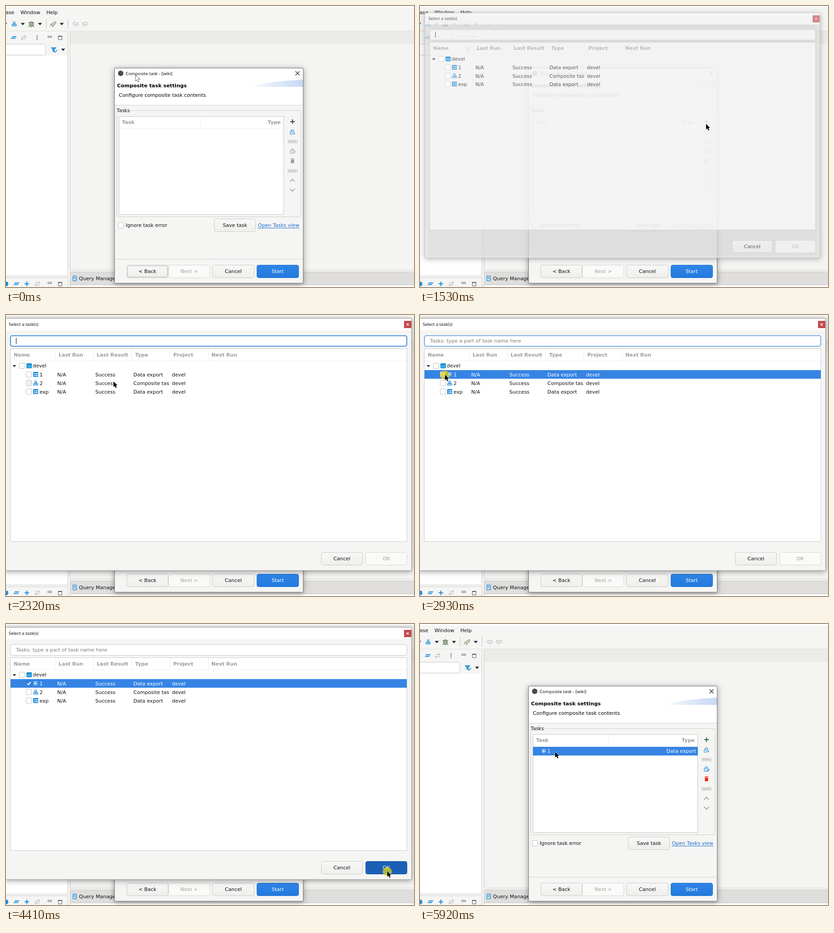
Animation, 900 px wide and 622 px high, one loop 7.17 s. Source, as an HTML page with a canvas:

```html
<!DOCTYPE html>
<html lang="en">
<head>
<meta charset="utf-8">
<title>Composite task</title>
<style>
  html, body { margin: 0; height: 100%; overflow: hidden; background: #f5f5f4; }
  canvas { display: block; }
</style>
</head>
<body>
<canvas width="900" height="622"></canvas>
<script>
const LOOP = 7170;
const ctx = document.querySelector('canvas').getContext('2d');
const UI = '11px "DejaVu Sans", sans-serif';
const BOLD = 'bold ' + UI;
const TITLE = '9.8px "Open Sans", sans-serif';
const BG = '#f5f5f4', INK = '#111', MUTED = '#9c9c9b', BLUE = '#3584e4', ICON = '#1b8ad6';
const ROW_TOP = 121.5, ROW_HEIGHT = 19.3;

// Moments of the story, in ms
const OPEN = 1450, FOCUS = 1700, SELECT = 2890, CHECK = 3010, PRESS = 4360, CLOSE = 4490, ADDED = 4550, PICK = 5840;
const CLICKS = [[1120, 1320], [2840, 3010], [PRESS, CLOSE], [5790, 5920]];

const smooth = u => u * u * (3 - 2 * u);
const easeIn = u => u ** 1.4;
const easeOut = u => 1 - (1 - u) ** 2;
const clamp = u => Math.max(0, Math.min(1, u));

// Pointer moves: first change, last change, number of changes, goal x, goal y, easing
const MOVES = [
  [30, 100, 3, 317, 162, smooth],
  [330, 990, 15, 629, 261, smooth],
  [1420, 1420, 1, 631, 261, smooth],
  [1860, 2320, 10, 237, 147, easeIn],
  [2370, 2650, 7, 55, 132, easeOut],
  [3390, 4080, 16, 841, 547, smooth],
  [4870, 5560, 16, 307, 287, smooth],
  [5610, 5610, 1, 298, 283, smooth],
];

function pointerAt(t) {
  let x = 286, y = 153;
  for (const [from, to, steps, goalX, goalY, ease] of MOVES) {
    if (t < from) break;
    const done = steps > 1 ? Math.floor((t - from) / (to - from) * (steps - 1) + 1e-6) + 1 : 1;
    const u = ease(Math.min(done, steps) / steps);
    x += (goalX - x) * u;
    y += (goalY - y) * u;
  }
  return { x, y };
}

function rect(x, y, w, h, color) {
  ctx.fillStyle = color;
  ctx.fillRect(x, y, w, h);
}

function box(x, y, w, h, fill, stroke, radius = 0, width = 1) {
  ctx.beginPath();
  ctx.roundRect(x + width / 2, y + width / 2, w - width, h - width, radius);
  if (fill) { ctx.fillStyle = fill; ctx.fill(); }
  if (stroke) { ctx.strokeStyle = stroke; ctx.lineWidth = width; ctx.stroke(); }
}

function text(label, x, y, color = INK, font = UI, align = 'left') {
  ctx.font = font;
  ctx.fillStyle = color;
  ctx.textAlign = align;
  ctx.fillText(label, x, y);
}

function shape(x, y, d, stroke, width = 1.2, fill) {
  const path = new Path2D(d);
  ctx.save();
  ctx.translate(x, y);
  if (fill) { ctx.fillStyle = fill; ctx.fill(path); }
  if (stroke) { ctx.strokeStyle = stroke; ctx.lineWidth = width; ctx.stroke(path); }
  ctx.restore();
}

function shadowed(draw) {
  ctx.save();
  ctx.shadowColor = 'rgba(0,0,0,.4)';
  ctx.shadowBlur = 12;
  ctx.shadowOffsetY = 2;
  draw();
  ctx.restore();
}

function button(label, x, y, w, style = 'plain') {
  const [top, bottom, edge, ink] = {
    plain: ['#f8f8f7', '#efeeed', '#cdc7c2', INK],
    off: ['#fafaf9', '#fafaf9', '#d8d5d2', '#a0a09f'],
    main: ['#2f86e8', '#2379dd', '#2273d4', '#fff'],
    hover: ['#3a8eec', '#2b81e3', '#2273d4', '#fff'],
    down: ['#1a5fb4', '#1b61b8', '#15539e', '#fff'],
  }[style];
  const fill = ctx.createLinearGradient(0, y, 0, y + 29);
  fill.addColorStop(0, top);
  fill.addColorStop(1, bottom);
  box(x, y, w, 29, fill, edge, 4);
  text(label, x + w / 2, y + 18, ink, UI, 'center');
}

function checkbox(x, y, state) {
  const on = state === 'on';
  box(x, y, 13, 13, on ? BLUE : state === 'hover' ? '#f0f0ef' : '#fff', on ? '#2a76d2' : '#c3beb9', 2);
  if (on) shape(x, y, 'M3 6.5L5.5 9.5L10.5 3.5', '#fff', 2);
}

const caret = (x, y) => shape(x, y, 'M-4.5 -2.5H4.5L0 2.5Z', null, 0, '#222');
const minus = (x, y) => shape(x, y, 'M-4 -2H6M-6 1.5H4', ICON, 1.8);
const swap = (x, y) => shape(x, y, 'M-5 -2H5L2 -5M5 2H-5L-2 5', '#aaa', 1.2);
const windowIcons = y => {
  box(92, y - 4, 9, 4, '#fff', '#555');
  box(115, y - 4, 9, 9, '#fff', '#555');
  rect(115, y - 4, 9, 2, '#555');
};
const dots = (x, y, count, dx, dy, color) => {
  for (let i = 0; i < count; i++) rect(x + i * dx, y + i * dy, 1.5, 1.5, color);
};

function exportIcon(x, y, selected) {
  const main = selected ? '#e8f6ff' : ICON, gap = selected ? BLUE : '#fff';
  rect(x, y, 11, 11, selected ? BLUE : ICON);
  if (selected) box(x + 1, y + 1, 9, 9, main);
  for (const row of [3, 7]) {
    rect(x + 2, y + row, 2, 2, selected ? '#159bd6' : gap);
    rect(x + 5, y + row, 5, 2, gap);
  }
}

const compositeIcon = (x, y) =>
  shape(x, y, 'M3.5 1H7.5V4.5H3.5ZM5.5 4.5V6.5M2.5 7V6H8.5V7M.7 7H4.3V10.3H.7ZM6.7 7H10.3V10.3H6.7Z', ICON, 1.2);

function drawWorkbench() {
  rect(0, 0, 900, 622, BG);
  rect(0, 0, 900, 3, '#fff');
  text('ase', -1, 18);
  text('Window', 32, 18);
  text('Help', 89, 18);

  for (const x of [-2, 37, 75, 123]) caret(x, 40);
  compositeIcon(12.5, 34);
  shape(56, 40, 'M-3 -3H3V4L0 6L-3 4ZM-3 -1L-6 -4M3 -1L6 -4M-3 1H-6M3 1H6M-3 3L-6 6M3 3L6 6M-2 -3V-5H2V-3M0 -1V4', '#4d6648', 1.2, '#cfdcc4');
  shape(104, 40, 'M-6 1L-1 -2L3 -5H6V-2L1 3L-1 6L-2 2ZM-5 3L-7 6', '#8a8a72', 1.2, '#d9d8c4');
  dots(88, 30, 7, 0, 3, '#aaa');
  dots(136, 30, 7, 0, 3, '#aaa');
  shape(153, 40, 'M-2 -5L-6 -1L-2 3V1H6V-3H-2ZM1 4H5', '#aaa', 1);
  shape(175, 40, 'M2 -5L6 -1L2 3V1H-6V-3H2ZM-1 4H-5', '#aaa', 1);

  // Left panel
  rect(0, 55, 137, 1, '#dededd');
  rect(0, 110, 136, 487, '#fff');
  rect(136, 56, 1, 541, '#c9c9c8');
  rect(0, 597, 137, 1, '#d0d0cf');
  rect(0, 601, 137, 1, '#d0d0cf');
  rect(136, 601, 1, 21, '#c9c9c8');
  minus(17, 70);
  swap(39, 70);
  for (const y of [66, 70, 74]) box(67, y - 1.5, 3, 3, '#fff', '#666', 1);
  windowIcons(70);
  box(-8, 84, 96, 25, '#fff', '#cdc7c2', 4);
  shape(105, 97, 'M-5 -5H5L1.5 0V5L-1.5 3V0Z', ICON, 1.2, '#3d9ee0');
  shape(109, 99, 'M-2 1L0 3L4 -2', ICON, 1.4);
  caret(126, 97);

  shape(0, 615, 'M0 -6L2 -4L5 -4L4 -1L6 1L4 3L3 5L0 5Z', null, 0, ICON);
  minus(23, 615);
  shape(46, 615, 'M-5 0H5M0 -5V5', ICON, 2);
  swap(69, 615);
  windowIcons(615);

  // Editor area and lower tabs
  rect(141, 55, 759, 1, '#dededd');
  rect(141, 56, 759, 28, '#ebebea');
  rect(141, 84, 759, 500, '#f4f4f3');
  rect(141, 56, 1, 529, '#c9c9c8');
  rect(141, 584, 759, 1, '#d0d0cf');
  rect(141, 588, 759, 29, '#dfdedd');
  rect(141, 588, 759, 1, '#c9c9c8');
  rect(141, 617, 759, 1, '#c9c9c8');
  rect(142, 618, 758, 4, '#fff');
  rect(141, 588, 1, 34, '#c9c9c8');
  box(147, 597, 9, 12, '#fff', ICON, 1, 1.5);
  shape(151.5, 603, 'M-2 -2H2M-2 0H1M1 2H3', ICON, 1.5);
  text('Query Manager', 161, 607);
}

function drawTaskTools(picked) {
  shape(632, 256, 'M-5 0H5M0 -5V5', picked ? '#2f6b3c' : '#2c4a38', 2);
  const basket = 'M-5 -1H4M-5 -1V5H1M-3 -1V-4L1 -5L3 -2M-2 2H1';
  shape(632, 279, basket + 'M1 3H6M3.5 .5V5.5', ICON, 1.2);
  shape(632, 321, basket + 'M1 5L5 0L6 2L3 5Z', picked ? ICON : '#a3a3a2', 1.2);
  const bin = picked ? '#ee2d12' : '#999';
  shape(632, 343, 'M-3.5 -3H3.5V5H-3.5ZM-4.5 -5H4.5V-4H-4.5ZM-1.5 -6H1.5V-5H-1.5Z', null, 0, bin);
  for (const y of [296, 361]) {
    rect(621, y, 22, 8, '#dcdcdb');
    dots(625, y + 3, 4, 4, 0, '#999');
  }
  shape(632, 386, 'M-5.5 3L0 -2.5L5.5 3', '#999', 1.6);
  shape(632, 407, 'M-5.5 -2.5L0 3L5.5 -2.5', '#999', 1.6);
}

function drawWizard(t) {
  const added = t >= ADDED, picked = t >= PICK;
  shadowed(() => rect(239, 137, 417, 477, BG));
  rect(240, 138, 415, 81, '#fff');
  rect(240, 219, 415, 1, '#d3d2d1');
  box(239, 137, 417, 477, null, '#777');

  ctx.beginPath();
  ctx.arc(253, 149, 6, 0, 7);
  ctx.fillStyle = '#4b4a48';
  ctx.fill();
  text('Composite task - [wiki]', 264, 153, '#000', TITLE);
  shape(643, 149, 'M-4.5 -4.5L4.5 4.5M4.5 -4.5L-4.5 4.5', '#222', 1.1);
  text('Composite task settings', 245, 180, '#000', 'bold 11.25px "DejaVu Sans", sans-serif');
  text('Configure composite task contents', 249, 201, '#000');

  const wave = ctx.createLinearGradient(536, 0, 655, 0);
  wave.addColorStop(0, '#fff');
  wave.addColorStop(.45, '#e2ebf9');
  wave.addColorStop(1, '#c6d8f3');
  shape(0, 0, 'M536 179Q585 166 655 163V179Z', null, 0, wave);

  box(244, 231, 407, 236, null, '#cfcdcb');
  rect(243, 228, 32, 8, BG);
  text('Tasks', 244, 235);
  box(249, 244, 364, 218, '#fff', '#c8c6c4');
  rect(250, 271, 362, 1, '#eeeeed');
  rect(added ? 415 : 428, 245, 1, 26, '#ececeb');
  text('Task', 256, 261, MUTED, BOLD);
  text('Type', 606, 261, MUTED, BOLD, 'right');
  if (added) {
    if (picked) rect(249, 272, 364, 19, BLUE);
    const ink = picked ? '#fff' : INK;
    exportIcon(268, 276, picked);
    text('1', 281, 285, ink);
    text('Data export', 609, 285, ink, UI, 'right');
  }
  drawTaskTools(picked);

  checkbox(247, 479);
  text('Ignore task error', 264, 489);
  button('Save task', 459, 471, 92);
  text('Open Tasks view', 647, 489, '#1b6acb', UI, 'right');
  rect(555, 491, 92, 1, '#1b6acb');

  rect(240, 560, 415, 1, '#d3d2d1');
  button('< Back', 266, 573, 92);
  button('Next >', 358, 573, 92, 'off');
  button('Cancel', 455, 573, 93);
  button('Start', 553, 573, 93, 'main');
  if (t < OPEN || (added && !picked)) {
    ctx.setLineDash([1, 1]);
    box(268, 575, 88, 25, null, '#888', 3);
    ctx.setLineDash([]);
  }
}

function drawTaskRow(index, name, type, icon, hovered, t) {
  const y = ROW_TOP + index * ROW_HEIGHT, base = Math.round(y + 14);
  const selected = index === 0 && t >= SELECT, ink = selected ? '#fff' : INK;
  if (selected) rect(10, 122, 874, 19, BLUE);
  const checked = index === 0 && t >= CHECK;
  checkbox(44, base - 11, checked ? 'on' : hovered ? 'hover' : 'off');
  icon(60, base - 10, selected);
  text(name, 74, base, ink);
  text('N/A', 113, base, ink);
  text('Success', 197, base, ink);
  ctx.save();
  ctx.beginPath();
  ctx.rect(278, y, 82.5, 20);
  ctx.clip();
  text(type, 281, base, ink);
  ctx.restore();
  text('devel', 366, base, ink);
}

function drawPicker(t, pointer) {
  const shown = t < CLOSE ? clamp((t - OPEN + 50) / 200) : .4;
  const scale = .92 + .08 * shown;
  ctx.save();
  ctx.globalAlpha = shown;
  ctx.translate(447 * (1 - scale), 286 * (1 - scale));
  ctx.scale(scale, scale);

  shadowed(() => rect(-2, 7, 897, 559, BG));
  rect(-2, 7, 897, 27, '#fff');
  box(-2, 7, 897, 559, null, '#a5a5a4');
  text('Select a task(s)', 6, 24, '#000', '9.6px "Open Sans", sans-serif');
  rect(878, 13, 16, 16, '#c44a4c');
  shape(886, 21, 'M-2.5 -2.5L2.5 2.5M2.5 -2.5L-2.5 2.5', '#fff', 1.3);

  const focus = t < SELECT ? clamp((t - FOCUS) / 170) : 1 - clamp((t - SELECT) / 150);
  box(9, 45, 876, 25, '#fff', '#cdc7c2', 4);
  if (focus > 0) {
    ctx.save();
    ctx.globalAlpha *= .2 + .8 * focus;
    box(9, 45, 876, 25, null, BLUE, 4, 1 + .8 * focus);
    ctx.restore();
  }
  if (t < SELECT) rect(22, 51, 1, 13, '#000');
  else text('Tasks: type a part of task name here', 22, 61, '#7c7c7b');

  box(9, 74, 876, 428, '#fff', '#cdcbc9');
  rect(10, 101, 874, 1, '#f1f1f0');
  for (const x of [109, 193, 277, 361, 446]) rect(x, 75, 1, 26, '#ececeb');
  const heads = { Name: 17, 'Last Run': 116, 'Last Result': 200, Type: 285, Project: 369, 'Next Run': 453 };
  for (const head in heads) text(head, heads[head], 92, MUTED, BOLD);

  shape(18.5, 113, 'M-4 -2H4L0 2.5Z', null, 0, '#333');
  const hoverRow = Math.floor((pointer.y - ROW_TOP) / ROW_HEIGHT);
  checkbox(29, 106, hoverRow === -1 ? 'hover' : 'off');
  box(45, 107, 12, 11, '#35a9e6', '#1583c4', 1);
  rect(46, 108, 10, 2, '#1583c4');
  text('devel', 59, 116);
  drawTaskRow(0, '1', 'Data export', exportIcon, hoverRow === 0, t);
  drawTaskRow(1, '2', 'Composite task', compositeIcon, hoverRow === 1, t);
  drawTaskRow(2, 'exp', 'Data export', exportIcon, hoverRow === 2, t);

  button('Cancel', 695, 525, 92);
  const over = pointer.x > 793 && pointer.y > 525;
  button('OK', 793, 525, 92, t < CHECK ? 'off' : t >= PRESS ? 'down' : over ? 'hover' : 'main');
  ctx.restore();
}

function drawPointer(t, { x, y }) {
  if (CLICKS.some(([from, to]) => t >= from && t < to)) {
    ctx.beginPath();
    ctx.arc(x, y + 1, 10, 0, 7);
    ctx.fillStyle = 'rgba(220,210,20,.75)';
    ctx.fill();
  }
  const arrow = 'M0 0V11.5L2.7 9L4.5 13.5L6.6 12.6L4.8 8.3H8.3Z';
  const overTitle = t < 330;
  ctx.save();
  ctx.translate(x, y);
  ctx.scale(1.08, 1.08);
  shape(0, 0, arrow, overTitle ? '#000' : '#fff', 1);
  shape(0, 0, arrow, null, 0, overTitle ? '#fff' : '#000');
  ctx.restore();
}

function draw(t) {
  const pointer = pointerAt(t);
  drawWorkbench();
  drawWizard(t);
  if (t >= OPEN && t < ADDED) drawPicker(t, pointer);
  drawPointer(t, pointer);
}

const start = performance.now();
function tick() {
  draw((performance.now() - start) % LOOP);
  requestAnimationFrame(tick);
}
tick();
</script>
</body>
</html>
```
